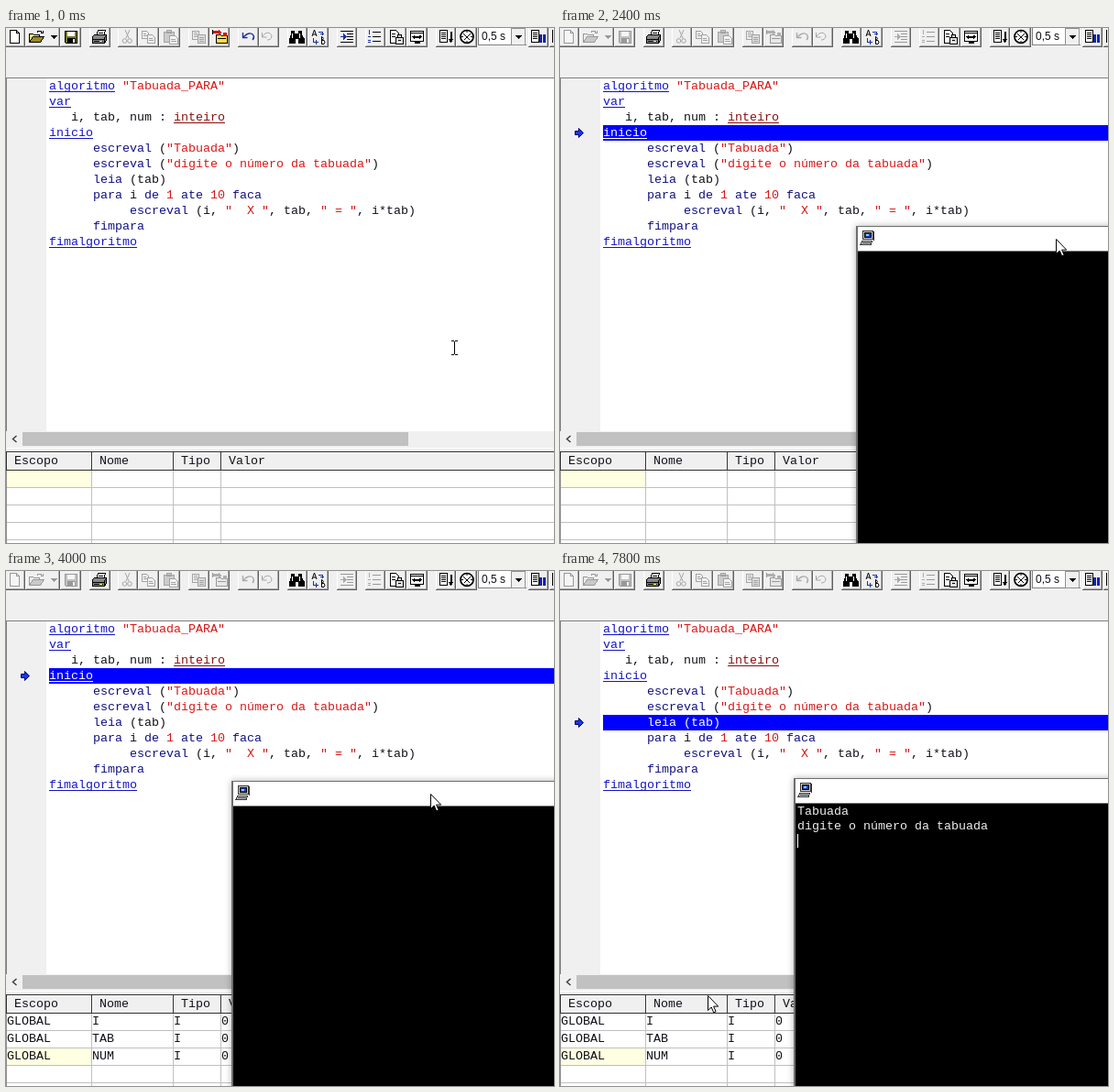
Write an HTML page that moves like this. It is 598 by 562 pixels and loops after 8000 ms.

```html
<!DOCTYPE html>
<html lang="pt">
<head>
<meta charset="utf-8">
<title>Tabuada</title>
<style>
@property --row { syntax: "<number>"; inherits: true; initial-value: -9; }
html, body { margin: 0; width: 100%; height: 100%; overflow: hidden; background: #f0f0f0; }
#stage { position: relative; width: 598px; height: 562px; overflow: hidden; background: #f0f0f0;
  font: 13.333px/17px "Liberation Mono", "Courier New", monospace; color: #101018; }
#stage div, #stage svg, #stage pre, #stage span.at { position: absolute; }
pre { margin: 0; font: inherit; }
svg { shape-rendering: crispEdges; overflow: visible; left: 0; top: 0; }
.anim, .anim * { animation-duration: 8s; animation-timing-function: step-end; animation-iteration-count: infinite; }

/* toolbar */
.k { fill: none; stroke: #000; }
.g { fill: none; stroke: #a3a3a3; }
.smooth { shape-rendering: auto; }
.live { animation-name: disable; }
@keyframes disable { 0% { filter: none; } 15%, 100% { filter: grayscale(1) opacity(.36); } }
#combo { left: 515px; top: 0; width: 53px; height: 19px; background: #fff; border: solid #808080; border-width: 0 0 1px 1px;
  box-sizing: border-box; font: 12px/19px "Liberation Sans", Arial, sans-serif; padding-left: 3px; }

/* editor */
#editor { left: 0; top: 54px; width: 598px; height: 386px; background: #fff; border: solid #808080; border-width: 1px 0 0 1px;
  box-sizing: border-box; overflow: hidden; animation-name: step; }
#gutter { left: 0; top: 0; width: 43px; height: 386px; background: #f0f0f0; }
#code, #hl pre { left: 46px; top: 0; }
#code b, #code i, #code u, #code em, #code s, #hl pre * { font-weight: 400; font-style: normal; text-decoration: none; }
#code b { color: #101080; }
#code s { color: #d81818; }
#code u { color: #1414c8; }
#code em { color: #8a1010; }
#editor pre u, #editor pre em { text-decoration: underline 1px; text-underline-offset: 2px; text-decoration-skip-ink: none; }
#hl { left: 46px; width: 552px; height: 17px; top: calc(var(--row) * 17px); background: #00f; overflow: hidden; }
#hl pre { left: 0; top: calc(var(--row) * -17px); color: #fff; }
#ptr { left: 14px; top: calc(var(--row) * 17px); }
@keyframes step {
  0% { --row: -9; } 17.5% { --row: 0; } 22.5% { --row: 1; } 30% { --row: 3; }
  67.5% { --row: 4; } 75% { --row: 5; } 80%, 100% { --row: 6; }
}
#thumb { left: 18px; top: 441px; width: 421px; height: 15px; background: #c1c1c1; }

/* variables */
#grid { left: 0; top: 483px; width: 598px; height: 79px; background: #fff; }
#vars { left: 0; top: 0; animation-name: fill; }
.cell { left: 1px; width: 92px; height: 18px; background: #ffffe1; animation-name: pick; }
@keyframes fill { 0% { visibility: hidden; } 37.5%, 100% { visibility: visible; } }
@keyframes pick { 0% { top: 483px; } 37.5%, 100% { top: 521px; } }

/* console */
#win { width: 420px; height: 420px; background: #000; border: 1px solid #6e6e6e; border-left-width: 2px; box-sizing: border-box;
  left: 0; top: 0; box-shadow: 0 0 7px rgba(0,0,0,.3); animation-name: drag; }
#bar { left: 0; top: 0; width: 420px; height: 26px; background: #fff; border-bottom: 1px solid #777; }
#win pre { left: 2px; line-height: 16px; color: #eee; }
#out1 { top: 28px; animation-name: show1; }
#out2 { top: 44px; animation-name: show2; }
#caret { left: 2px; top: 60px; width: 1px; height: 15px; background: #fff; animation-name: blink; }
@keyframes show1 { 0% { opacity: 0; } 75%, 100% { opacity: 1; } }
@keyframes show2 { 0% { opacity: 0; } 80%, 100% { opacity: 1; } }
@keyframes blink { 0% { opacity: 0; } 82.5% { opacity: 1; } 90% { opacity: 0; } 95%, 100% { opacity: 1; } }
@keyframes drag {
  0% { transform: translate(700px, 216px); }
  30% { transform: translate(323px, 216px); }
  40% { transform: translate(311px, 219px); }
  42.5% { transform: translate(292px, 223px); }
  45% { transform: translate(270px, 227px); }
  47.5% { transform: translate(253px, 229px); }
  50% { transform: translate(246px, 229px); }
  55% { transform: translate(249px, 228px); }
  57.5% { transform: translate(253px, 227px); }
  60%, 100% { transform: translate(255px, 226px); }
}

/* pointers */
#arrow { animation-name: arrow; }
#beam { mix-blend-mode: difference; animation-name: beam; }
@keyframes arrow {
  0% { transform: translate(-60px, 0); }
  7.5% { transform: translate(472px, 30px); }
  10% { transform: translate(-60px, 0); }
  27.5% { transform: translate(556px, 30px); }
  30% { transform: translate(541px, 230px); }
  40% { transform: translate(529px, 233px); }
  42.5% { transform: translate(510px, 237px); }
  45% { transform: translate(488px, 241px); }
  47.5% { transform: translate(470px, 243px); }
  50% { transform: translate(463px, 243px); }
  55% { transform: translate(466px, 242px); }
  57.5% { transform: translate(470px, 241px); }
  60% { transform: translate(472px, 240px); }
  62.5% { transform: translate(-60px, 0); }
  87.5% { transform: translate(246px, 505px); }
  90% { transform: translate(216px, 490px); }
  92.5% { transform: translate(188px, 476px); }
  95% { transform: translate(169px, 467px); }
  97.5%, 100% { transform: translate(161px, 463px); }
}
@keyframes beam {
  0% { transform: translate(489px, 349px); }
  2.5% { transform: translate(486px, 250px); }
  5% { transform: translate(479px, 120px); }
  7.5% { transform: translate(-60px, 0); }
  62.5% { transform: translate(400px, 440px); }
  65% { transform: translate(-60px, 0); }
  72.5% { transform: translate(296px, 546px); }
  75% { transform: translate(288px, 532px); }
  77.5% { transform: translate(284px, 524px); }
  80% { transform: translate(282px, 521px); }
  82.5% { transform: translate(281px, 520px); }
  85% { transform: translate(277px, 516px); }
  87.5%, 100% { transform: translate(-60px, 0); }
}
</style>
</head>
<body>
<div id="stage" class="anim">
  <svg id="tools" width="598" height="22">
    <g id="buttons"></g>
    <g class="live">
      <path class="k" style="fill:#fff" d="M4.5 2.5h7l3 3v11h-10zM11.5 2.5v3h3"/>
      <path class="k" style="fill:#ffe97a" d="M25.5 15.5v-9h4l1 1h6v2"/>
      <path class="k" style="fill:#9a8a20" d="M25.5 15.5l4-6h12l-4 6z"/>
      <path class="k" d="M33.5 4.5h1v-1h4v2h2M40.5 3v3"/>
      <path d="M49 8h7l-3.500 4z"/>
      <path class="k" style="fill:#77772a" d="M64.500 3.500h13v13h-12l-1-1z"/>
      <path fill="#fff" d="M67 4h8v5h-8z"/><path d="M67 11h9v5h-9z"/><path fill="#fff" d="M73 12h2v4h-2z"/>
    </g>
    <g>
      <path class="k" style="fill:#fff" d="M98.500 8.500l2-6h8l-2 6zM101 5.500h5"/>
      <path class="k" style="fill:#888" d="M94.500 9.500l2-2h13v6l-2 3h-13z"/>
      <path class="k" d="M94 12.500h13M96 14.500h10M107.500 16v-5l2-3"/><path fill="#dd3" d="M102 14h3v1h-3z"/>
    </g>
    <g class="g">
      <g class="smooth"><path d="M130 2l4 9M135 2l-4 9"/><circle cx="129.500" cy="14" r="2.300"/><circle cx="135" cy="14" r="2.300"/></g>
      <path d="M148.500 3.500h5l2 2v6h-7zM150 6.500h3M150 8.500h4"/>
      <path style="fill:#f0f0f0" d="M154.500 7.500h5l3 3v6h-8zM156 11.500h4M156 13.500h5"/>
      <path style="fill:#ccc" d="M172.500 4.500h11v11h-11zM175.500 2.500h5v3h-5z"/>
      <path style="fill:#f4f4f4" d="M178.500 8.500h6l3 3v6h-9zM180 12.500h5M180 14.500h6"/>
      <path d="M203.500 3.500h7v9h-7zM205 5.500h4M205 7.500h4M205 9.500h4"/>
      <path style="fill:#ddd" d="M209.500 7.500h8v9h-8zM211 10.500h5M211 12.500h5M211 14.500h5"/>
      <path class="smooth" d="M280 9c3-5 9-5 10 0 0 3-3 4-5 4M279.500 5v5h5"/>
    </g>
    <g class="live">
      <path class="k" style="fill:#ffe040" d="M229.500 7.500h5l1 1h6v8h-12z"/>
      <path fill="#d81010" d="M226 3h6v-1l4 3-4 3v-2h-6zM237 5h4v4h-4z"/>
      <path class="k" d="M231 11.500h9M225.500 2v5"/>
      <path class="smooth" style="fill:none;stroke:#1830a0;stroke-width:1.400" d="M269 13c3-3 1-8-4-7-3 .500-4 2-6 4M258.500 5v5.500h5"/>
      <path class="k" d="M365 3.500h14M372 6.500h7M372 9.500h7M372 12.500h7M365 15.500h14"/>
      <path fill="#1830a0" d="M365 9h3v-3l4 3.500-4 3.500v-3h-3z"/>
      <path class="k" d="M400 4.500h9M400 9.500h9M400 14.500h9"/>
      <path fill="none" stroke="#1830a0" d="M396.500 2v5M395 9.500h3M395 13.500h3M395 15.500h3"/>
    </g>
    <g>
      <path d="M311 3h4v3h4V3h4v4l3 5v5h-7v-5h-3v5h-7v-5l2-5z"/>
      <path fill="#fff" d="M312 6h1v5h-1zM320 6h1v5h-1z"/>
      <path class="k smooth" d="M334 9l2.500-7 2.500 7M335 7h3"/><path class="k smooth" d="M344.500 9.500v8h2.500q2-2 0-4h-2q3-2 0-4z"/>
      <path fill="none" stroke="#1830a0" d="M341 4.500h4v3M343 6.500h4M335.500 11v4h5M338.500 13v5"/>
      <path class="k" style="fill:#fff" d="M419.500 2.500h6l3 3v11h-9zM421 6.500h4M421 9.500h4"/>
      <path class="k" style="fill:#ddd" d="M425.500 10.500h8v7h-8zM427.500 10v-3h4v3M428 13.500h3"/>
      <path class="k" style="fill:#fff" d="M441.500 3.500h14v11h-14zM441 5.500h14"/>
      <path d="M443 9.500l3-2v1.500h5V7.500l3 2-3 2.500v-1.500h-5v1.500zM446 15h6v2h-6z"/>
      <path class="k" style="fill:#fff" d="M473.500 2.500h8v13h-8zM475 5.500h5M475 7.500h5M475 9.500h5M475 11.500h5"/>
      <path d="M485 4h1.500v8h2l-3 4-3-4h2.500z"/>
      <g class="smooth"><circle cx="503" cy="9.500" r="7" fill="#fff" stroke="#000" stroke-width="1.700"/>
      <path class="k" d="M499 6l7 7M507 6l-7 7M503 3v2M503 14v2M497 9.500h2M507 9.500h2"/></g>
      <path class="k" style="fill:#fff" d="M573.500 2.500h8v13h-8zM575 5.500h5M575 7.500h5M575 9.500h5M575 11.500h5"/>
      <path fill="#1020b0" d="M582 7h3v9h-3zM586 7h3v9h-3z"/>
      <path class="k" d="M596.500 2v14"/>
    </g>
  </svg>
  <div id="combo">0,5 s</div>
  <svg width="598" height="22"><path fill="#f0f0f0" stroke="#909090" d="M551.500 .500h15v18h-15z"/><path d="M555 8h8l-4 4z"/></svg>

  <div id="editor">
    <div id="gutter"></div>
<pre id="code"><u>algoritmo</u> <s>"Tabuada_PARA"</s>
<u>var</u>
   i, tab, num : <em>inteiro</em>
<u>inicio</u>
      <b>escreval</b> (<s>"Tabuada"</s>)
      <b>escreval</b> (<s>"digite o número da tabuada"</s>)
      <b>leia</b> (tab)
      <b>para</b> i <b>de</b> <s>1</s> <b>ate</b> <s>10</s> <b>faca</b>
           <b>escreval</b> (i, <s>"  X "</s>, tab, <s>" = "</s>, i*tab)
      <b>fimpara</b>
<u>fimalgoritmo</u></pre>
    <div id="hl"></div>
    <svg id="ptr" width="12" height="17"><path class="smooth" fill="#1838e8" stroke="#000070" d="M1.500 6.500h4v-3l5 5-5 5v-3h-4z"/></svg>
  </div>
  <div id="thumb"></div>
  <svg width="598" height="562"><path class="smooth" fill="none" stroke="#404040" stroke-width="1.500" d="M11.500 445l-4 3.500 4 3.500"/></svg>

  <div id="grid"></div>
  <div class="cell"></div>
  <svg id="lines" width="598" height="562"></svg>
  <div id="head"></div>
  <div id="vars"></div>

  <div id="win">
    <div id="bar"></div>
    <svg width="24" height="24">
      <path fill="#d0d0d0" stroke="#333" d="M5.500 4.500h11v9h-11z"/>
      <path fill="#1840c0" stroke="#000" d="M7.500 6.500h7v5h-7z"/><path fill="#7cf" d="M9 8h3v2h-3z"/>
      <path fill="#c8c8c8" stroke="#333" d="M4.500 15.500h11l-1.500 4h-11z"/><path stroke="#333" d="M5 17.500h9M17.500 5v10"/>
    </svg>
    <pre id="out1">Tabuada</pre>
    <pre id="out2">digite o número da tabuada</pre>
    <div id="caret"></div>
  </div>

  <svg id="arrow" class="smooth" width="13" height="20"><path fill="#fff" stroke="#000" d="M.500 .500v16l3.700-3.500 2.500 5.800 2.400-1-2.500-5.700h5.100z"/></svg>
  <svg id="beam" width="8" height="17"><path fill="none" stroke="#fff" d="M-3 -7.500h3M1 -7.500h3M.500 -7v14M-3 7.500h3M1 7.500h3"/></svg>
</div>
<script>
const $ = id => document.getElementById(id);

// Toolbar buttons: left edge and width
const buttons = [[-2, 23], [21, 38], [59, 23], [91, 23], [122, 22], [144, 23], [167, 23], [199, 23], [222, 22],
  [253, 23], [276, 22], [307, 22], [329, 23], [361, 22], [392, 22], [414, 23], [437, 23], [469, 22], [491, 23], [570, 22], [593, 22]];
$("buttons").innerHTML = buttons.map(([x, w]) =>
  `<path fill="none" stroke="#fff" d="M${x + .5} 0v20"/>` +
  `<path fill="none" stroke="#a8a8a8" d="M${x + 1} 19.5h${w - 2}M${x + w - 1.5} 0v20"/>` +
  `<path fill="none" stroke="#606060" d="M${x} 20.5h${w}M${x + w - .5} 0v21"/>`).join("");

// White copy of the code, seen only through the highlighted row
const copy = $("code").cloneNode(true);
copy.removeAttribute("id");
$("hl").append(copy);

const label = (x, y, text) => `<span class="at" style="left:${x}px;top:${y}px">${text}</span>`;
const cols = [93, 182, 234];
const path = (color, d) => `<path fill="none" stroke="${color}" d="${d}"/>`;
const rules = [501, 520, 539, 558].map(y => `M0 ${y + .5}h598`).join("");
$("lines").innerHTML =
  path("#c0c0c0", rules + cols.map(x => `M${x + .5} 483v79`).join("")) +
  path("#fff", "M0 458.5h598M1 463.5h597" + [0, ...cols].map(x => `M${x + 1.5} 463v19`).join("")) +
  path("#303030", "M0 462.5h598M0 482.5h598M.5 462v21" + cols.map(x => `M${x + .5} 462v21`).join("")) +
  path("#909090", "M.5 483v79");

$("head").innerHTML = label(9, 464, "Escopo") + label(102, 464, "Nome") + label(191, 464, "Tipo") + label(243, 464, "Valor");
$("vars").innerHTML = ["I", "TAB", "NUM"].map((name, i) => {
  const y = 483 + 19 * i;
  return label(1, y, "GLOBAL") + label(94, y, name) + label(183, y, "I") + label(235, y, "0");
}).join("");
</script>
</body>
</html>
```
